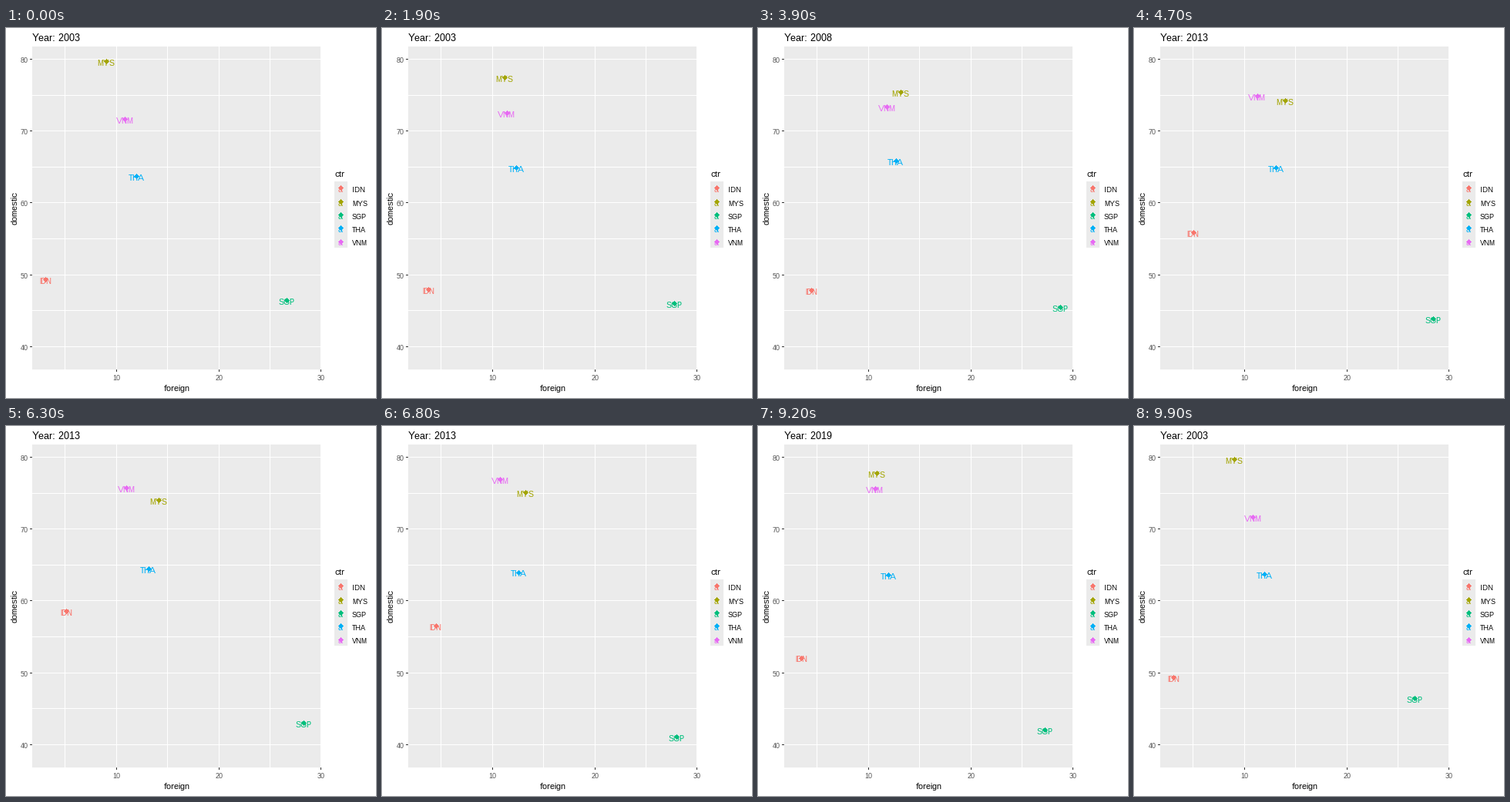
A matplotlib script that plays this animation: 480 px wide and 480 px high, repeating every 10000 ms.

```python
import matplotlib.pyplot as plt
import numpy as np
from matplotlib.animation import FuncAnimation
from matplotlib.patches import Rectangle, RegularPolygon

plt.rcParams.update({
    "font.family": "Liberation Sans",
    "text.antialiased": True,
    "text.hinting": "native",
    "text.hinting_factor": 1,
    "toolbar": "None",
})

SIZE, DPI = 480, 72  # at 72 dpi one point is one pixel
FRAMES, INTERVAL = 100, 100
YEARS = (2003, 2008, 2013, 2019)

# (foreign, domestic) share in each year
SHARES = {
    "IDN": ("#F8766D", [(3.05, 49.3), (4.33, 46.8), (5.2, 58.9), (3.73, 54)]),
    "MYS": ("#A3A500", [(8.98, 79.7), (13, 75.5), (14.26, 73.8), (12.13, 76.3)]),
    "SGP": ("#00BF7D", [(26.62, 46.4), (28.77, 45.6), (28.34, 43.3), (27.6, 38.8)]),
    "THA": ("#00B0F6", [(11.97, 63.7), (12.6, 65.9), (13.22, 64.5), (11.9, 63.4)]),
    "VNM": ("#E76BF3", [(10.84, 71.6), (11.85, 73.2), (11.04, 75.4), (10.47, 78.4)]),
}
STARTS = (12, 38, 62, 87)  # last still frame of each year
STEP = (FRAMES - 1) / len(YEARS)

LEFT, TOP, RIGHT, BOTTOM = 34, 24, 408, 443
GREY, TICK, AXIS_TEXT = "#EBEBEB", "#333333", "#4D4D4D"

fig = plt.figure(figsize=(SIZE / DPI, SIZE / DPI), dpi=DPI, facecolor="white")
ax = fig.add_axes([0, 0, 1, 1])
ax.set(xlim=(0, SIZE), ylim=(SIZE, 0))
ax.axis("off")


def to_px(foreign, domestic):
    return 10.5 + 13.28 * foreign, 40.45 + 9.32 * (80 - domestic)


def box(x, y, w, h, color):
    ax.add_patch(Rectangle((x, y), w, h, fc=color, ec="none", lw=0, aa=False))


def label(x, y, text, size=11, color="black", ha="left", **kw):
    return ax.text(x, y, text, fontsize=size, color=color, ha=ha,
                   va="baseline", **kw)


class Marker:
    """A small dot with a text centred on it."""

    def __init__(self, text, color, x=0, y=0):
        self.dot = ax.add_patch(RegularPolygon(
            (0, 0), 4, radius=2.6, fc=color, ec="none", lw=0, aa=False))
        self.text = label(0, 0, text, color=color, ha="center")
        self.move(x, y)

    def move(self, x, y):
        self.dot.xy = (np.floor(x + 0.5) + 0.5, np.floor(y) + 0.5)
        self.text.set_position((x, y + 5.4))


def draw_panel():
    box(LEFT, TOP, RIGHT - LEFT, BOTTOM - TOP, GREY)
    for value in range(40, 81, 5):
        y = int(to_px(0, value)[1])
        box(LEFT, y, RIGHT - LEFT, 1, "white")
        if value % 10 == 0:
            box(LEFT - 3, y, 3, 1, TICK)
            label(29, y + 5, str(value), 9, AXIS_TEXT, "right")
    for value in range(5, 31, 5):
        x = int(to_px(value, 0)[0])
        box(x, TOP, 1, BOTTOM - TOP, "white")
        if value % 10 == 0:
            box(x, BOTTOM, 1, 3, TICK)
            label(x + 0.5, 457, str(value), 9, AXIS_TEXT, "center")
    label(221.5, 471, "foreign", ha="center")
    label(15, 233.5, "domestic", ha="center", rotation=90,
          rotation_mode="anchor")


def draw_legend():
    label(426, 193, "ctr")
    box(426, 199, 17, 86, GREY)
    for i, (name, (color, _)) in enumerate(SHARES.items()):
        y = 207.9 + 17.28 * i
        Marker("a", color, 434, y)
        label(449, y + 5.4, name, 9)


def progress(frame):
    """Year index and how far it has moved towards the next one."""
    for i, start in enumerate(STARTS):
        end = round(STEP * (i + 1))
        if frame < end:
            return i, max(0, (frame - start) / (end - start))
    return 0, 0


draw_panel()
draw_legend()
title = label(34, 17, "", 13)
markers = [(Marker(name, color), np.array(shares))
           for name, (color, shares) in SHARES.items()]


def update(frame):
    i, t = progress(frame)
    j = (i + 1) % len(YEARS)
    title.set_text(f"Year: {YEARS[j if t > 0.54 else i]}")
    for marker, shares in markers:
        marker.move(*to_px(*(shares[i] + (shares[j] - shares[i]) * t)))
    return [title]


anim = FuncAnimation(fig, update, frames=FRAMES, interval=INTERVAL,
                     init_func=lambda: update(0), repeat=True, repeat_delay=0)
plt.show()
```
